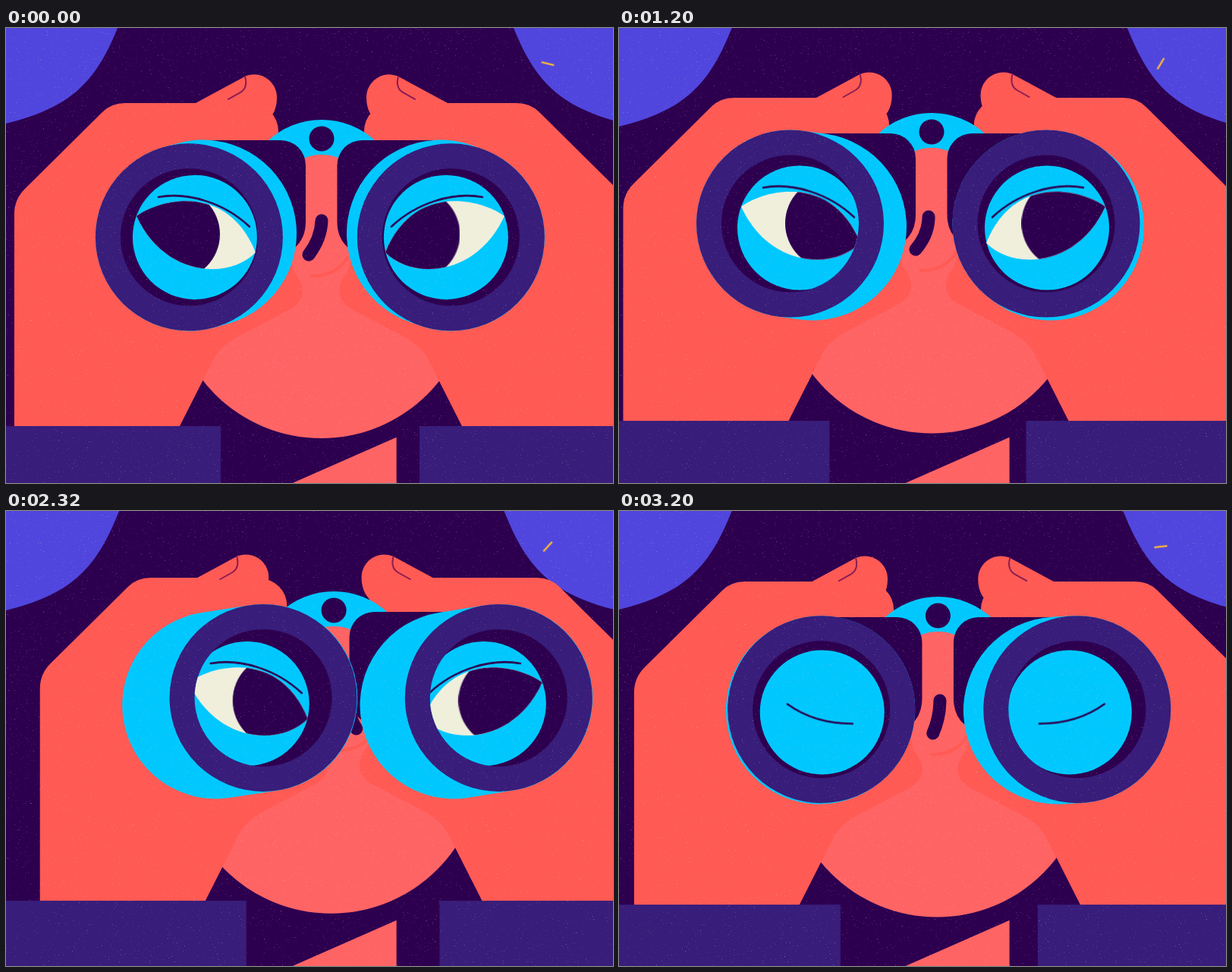
Recreate the animation shown at these times as an HTML page without scripts. Size 800 px wide and 600 px high, loop 3.28 s.

```html
<!DOCTYPE html>
<html lang="en">
<head>
<meta charset="utf-8">
<title>Lookout</title>
<style>
html, body { margin: 0; width: 100%; height: 100%; overflow: hidden; background: #2d004f; }
svg { position: absolute; left: 0; top: 0; width: 800px; height: 600px; }

/* pan, rise: binoculars; al, ar, arm: both arms; thumb, hair, neck: heights;
   fl, fr, fy: front rims; el, er, ey: eyes inside the rims */
@property --pan { syntax: "<length>"; inherits: true; initial-value: 0px; }
@property --rise { syntax: "<length>"; inherits: true; initial-value: 0px; }
@property --al { syntax: "<length>"; inherits: true; initial-value: 0px; }
@property --ar { syntax: "<length>"; inherits: true; initial-value: 0px; }
@property --arm { syntax: "<length>"; inherits: true; initial-value: 0px; }
@property --thumb { syntax: "<length>"; inherits: true; initial-value: 0px; }
@property --hair { syntax: "<length>"; inherits: true; initial-value: 0px; }
@property --neck { syntax: "<length>"; inherits: true; initial-value: 0px; }
@property --fl { syntax: "<length>"; inherits: true; initial-value: 0px; }
@property --fr { syntax: "<length>"; inherits: true; initial-value: 0px; }
@property --fy { syntax: "<length>"; inherits: true; initial-value: 0px; }
@property --el { syntax: "<length>"; inherits: true; initial-value: 0px; }
@property --er { syntax: "<length>"; inherits: true; initial-value: 0px; }
@property --ey { syntax: "<length>"; inherits: true; initial-value: 0px; }

.scene {
  --settle: cubic-bezier(.1,.6,.3,1);
  --drift: cubic-bezier(.2,.4,.5,1);
  --start: cubic-bezier(.65,0,.8,.55);
  --land: cubic-bezier(.2,.6,.4,1);
  animation: turn 3.28s infinite;
}
@keyframes turn {
  0%, 100% { --pan: 0px; --rise: 0px; --al: 0px; --ar: 0px; --arm: 0px; --thumb: 0px; --hair: 0px; --neck: 0px;
    --fl: 241.5px; --fr: 586.5px; --fy: 276px; --el: 7.5px; --er: -6.5px; --ey: 0px;
    animation-timing-function: cubic-bezier(.1,.6,.3,1); }
  14.63% { --pan: -2.5px; --rise: -6px; --al: -4px; --ar: -6px; --arm: -4px; --thumb: -2px; --hair: 3px; --neck: 0px;
    --fl: 230.5px; --fr: 570.5px; --fy: 265px; --el: 10.5px; --er: -1px; --ey: 3px;
    animation-timing-function: cubic-bezier(.2,.4,.5,1); }
  36.59% { --pan: -4px; --rise: -9px; --al: -5.5px; --ar: -8.5px; --arm: -7px; --thumb: -3px; --hair: 4px; --neck: 0px;
    --fl: 225.5px; --fr: 563px; --fy: 258px; --el: 12.5px; --er: 1px; --ey: 5.5px;
    animation-timing-function: cubic-bezier(.65,0,.8,.55); }
  46.34% { --pan: 1px; --rise: 21px; --al: 2px; --ar: 2px; --arm: 22px; --thumb: 20px; --hair: 22px; --neck: 15px;
    --fl: 248.5px; --fr: 592px; --fy: 311.5px; --el: 6.5px; --er: -8px; --ey: -4px;
    animation-timing-function: cubic-bezier(.2,.6,.4,1); }
  60.98% { --pan: 13px; --rise: -15.3px; --al: 26px; --ar: 21px; --arm: -11.5px; --thumb: -4px; --hair: 5px; --neck: 0px;
    --fl: 318.5px; --fr: 636.5px; --fy: 246px; --el: -15.5px; --er: -17.5px; --ey: 7.5px;
    animation-timing-function: cubic-bezier(.2,.4,.5,1); }
  80.49% { --pan: 17px; --rise: -15px; --al: 36px; --ar: 28px; --arm: -11px; --thumb: -4px; --hair: 5px; --neck: 0px;
    --fl: 345px; --fr: 653px; --fy: 246.5px; --el: -23px; --er: -20px; --ey: 7.7px;
    animation-timing-function: cubic-bezier(.65,0,.8,.55); }
  97.56% { --pan: 4.5px; --rise: -8px; --al: 9px; --ar: 7px; --arm: -6px; --thumb: -2px; --hair: 4px; --neck: 0px;
    --fl: 267px; --fr: 604px; --fy: 261.5px; --el: 1px; --er: -10px; --ey: 3.8px;
    animation-timing-function: linear; }
}

.hair-l { transform: translate(0, var(--hair)); }
.hair-r { transform: translate(calc(var(--pan) * -.65), var(--hair)); }
.neck { transform: translate(0, var(--neck)); }
.face { transform: translate(calc(var(--pan) * .8), calc(var(--arm) * .92)); }
.mouth { transform: translate(var(--al), var(--arm)); }
.arm-l { transform: translate(var(--al), var(--arm)); }
.arm-r { transform: translate(var(--ar), var(--arm)); }
.knuckle-l { transform: translate(calc(var(--pan) * .7), var(--arm)); }
.knuckle-r { transform: translate(calc(var(--pan) * 1.1), var(--arm)); }
.thumb-l { transform: translate(calc(var(--pan) * -.67), var(--thumb)); }
.thumb-r { transform: translate(calc(var(--pan) * -.4), var(--thumb)); }
.frame { transform: translate(var(--pan), var(--rise)); }
.front-l { transform: translate(var(--fl), var(--fy)); }
.front-r { transform: translate(var(--fr), var(--fy)); }
.eye-l { transform: translate(var(--el), var(--ey)); }
.eye-r { transform: translate(var(--er), var(--ey)); }

.barrel { fill: none; stroke: #00c8ff; stroke-width: 247; stroke-linecap: round; }
.barrel-l { animation: barrel-l 3.28s infinite; }
.barrel-r { animation: barrel-r 3.28s infinite; }
.nose { fill: none; stroke: #2d004f; stroke-width: 17; stroke-linecap: round; animation: nose 3.28s infinite; }
@keyframes barrel-l {
  0%, 100% { d: path("M259.5 271L241.5 276"); animation-timing-function: var(--settle); }
  14.63% { d: path("M257 265L230.5 265"); animation-timing-function: var(--drift); }
  36.59% { d: path("M255.5 262L225.5 258"); animation-timing-function: var(--start); }
  46.34% { d: path("M260.5 292L248.5 311.5"); animation-timing-function: var(--land); }
  60.98% { d: path("M273.5 256L318.5 246"); animation-timing-function: var(--drift); }
  80.49% { d: path("M277.5 256L345 246.5"); animation-timing-function: var(--start); }
  97.56% { d: path("M264.5 263L267 261.5"); animation-timing-function: linear; }
}
@keyframes barrel-r {
  0%, 100% { d: path("M572.5 271L586.5 276"); animation-timing-function: var(--settle); }
  14.63% { d: path("M570 265L570.5 265"); animation-timing-function: var(--drift); }
  36.59% { d: path("M568.5 262L563 258"); animation-timing-function: var(--start); }
  46.34% { d: path("M573.5 292L592 311.5"); animation-timing-function: var(--land); }
  60.98% { d: path("M586 256L636.5 246"); animation-timing-function: var(--drift); }
  80.49% { d: path("M591 256L653 246.5"); animation-timing-function: var(--start); }
  97.56% { d: path("M577.5 263L604 261.5"); animation-timing-function: linear; }
}
@keyframes nose {
  0%, 100% { d: path("M416 254Q415 278 399 299"); animation-timing-function: var(--settle); }
  14.63% { d: path("M411 251Q410 275 394 294"); animation-timing-function: var(--drift); }
  36.59% { d: path("M408 249Q408 272 391 292"); animation-timing-function: var(--start); }
  46.34% { d: path("M418 283Q418 306 403 328"); animation-timing-function: var(--land); }
  60.98% { d: path("M438 245Q438 268 448 287"); animation-timing-function: var(--drift); }
  80.49% { d: path("M452 245Q453 268 465 287"); animation-timing-function: var(--start); }
  97.56% { d: path("M423 250Q423 272 414 293"); animation-timing-function: linear; }
}

.lid { animation: lid 3.28s linear infinite; }
.crease { fill: none; stroke: #2d004f; stroke-width: 2.6; stroke-linecap: round; animation: crease 3.28s linear infinite; }
.iris { fill: #2d004f; animation: glance 3.28s ease-in-out infinite; }
@keyframes lid {
  0%, 28%, 35.4%, 41.5%, 52.4%, 78%, 87.2%, 92.7%, 100% { d: path("M-77 -28C-40 -54 45 -68 80 20C45 56 -40 53 -77 -28Z"); }
  80.49% { d: path("M-77 -28C-45 0 0 24 80 20C40 36 -30 38 -77 -28Z"); }
  31.7%, 45.1%, 47.6%, 82.3%, 95.7%, 97.7% { d: path("M-77 -28C-35 25 30 32 80 22C30 32 -35 25 -77 -28Z"); }
}
@keyframes crease {
  0%, 28%, 35.4%, 41.5%, 52.4%, 78%, 87.2%, 92.7%, 100% { d: path("M-48 -53C-10 -60 38 -46 72 -14"); }
  80.49% { d: path("M-46 -17C-20 -6 12 4 45 10.5"); }
  31.7%, 45.1%, 47.6%, 82.3%, 95.7%, 97.7% { d: path("M-46 -11C-20 8 8 15 40 15"); }
}
@keyframes glance {
  0%, 100% { transform: translate(-27px, -4px); }
  14.63%, 30% { transform: translate(-30px, -20px); }
  34%, 46.34% { transform: translate(41px, -6px); }
  60.98%, 81% { transform: translate(41px, -4px); }
  86%, 97.56% { transform: translate(-27px, -4px); }
}

.tick { animation: spin 3.28s linear infinite; }
@keyframes spin {
  0%, 100% { transform: rotate(14deg); }
  14.63% { transform: rotate(-40deg); }
  36.59% { transform: rotate(-59deg); }
  46.34% { transform: rotate(-75deg); }
  60.98% { transform: rotate(-33deg); }
  80.49% { transform: rotate(-61deg); }
  97.56% { transform: rotate(-7deg); }
}
.grain { opacity: .45; will-change: transform; pointer-events: none; }
</style>
</head>
<body>
<svg class="scene" viewBox="0 0 800 600">
  <defs>
    <clipPath id="bore"><circle r="90.5"/></clipPath>
    <clipPath id="slit"><path class="lid" d="M-77 -28C-40 -54 45 -68 80 20C45 56 -40 53 -77 -28Z"/></clipPath>
    <path id="hair" fill="#2d004f" d="M170 -50L147 0C118 72 85 105 0 126L-40 136V700H430V-50Z"/>
    <path id="hand" fill="#ff5a54" d="M11 640V245Q11 226 25 212L127 111Q139 99 157 99H300L330 150 380 322C396 341 394 360 374 371L304 408Q281 420 271 442L229 525V640Z"/>
    <g id="thumb">
      <path fill="#ff5a54" d="M250 99L312 65.4A30 30 0 0 1 357 91.5Q357 104 352 113L340 130H250Z"/>
      <path fill="none" stroke="#8a1d55" stroke-width="2" stroke-linecap="round" d="M315 64Q319 79 309 85L293 94"/>
    </g>
    <circle id="knuckle" cx="323" cy="136" r="36" fill="#ff5a54"/>
    <path id="housing" fill="#2d004f" d="M262 148H362A33 33 0 0 1 395 181V255Q395 278 380 290L262 300Z"/>
    <g id="rim">
      <circle r="123.5" fill="#381d7a"/>
      <circle r="90.5" fill="#2d004f"/>
    </g>
  </defs>

  <rect width="800" height="600" fill="#5046de"/>
  <g stroke-width="2.4">
    <g transform="translate(714 47)"><path class="tick" stroke="#f7b53c" d="M-8.5 0H8.5"/></g>
    <path stroke="#00c9a7" transform="translate(83 105) rotate(-62)" d="M-8.5 0H8.5"/>
  </g>
  <g class="hair-l"><use href="#hair"/></g>
  <g class="hair-r"><use href="#hair" transform="matrix(-1 0 0 1 816 0)"/></g>

  <path class="neck" fill="#ff6464" d="M514.6 539.7V640H287Z"/>
  <circle class="face" cx="415.5" cy="343" r="198" fill="#ff6464"/>
  <path class="mouth" fill="none" stroke="#ff5a54" stroke-width="4" stroke-linecap="round" d="M403 327Q435 327 450 303"/>
  <path class="nose" d="M416 254Q415 278 399 299"/>

  <g class="arm-l">
    <use href="#hand"/>
    <rect x="-80" y="525" width="363" height="140" fill="#381d7a"/>
  </g>
  <g class="arm-r">
    <use href="#hand" transform="matrix(-1 0 0 1 830 0)"/>
    <rect x="545" y="525" width="363" height="140" fill="#381d7a"/>
  </g>
  <g class="knuckle-l"><use href="#knuckle"/></g>
  <g class="knuckle-r"><use href="#knuckle" transform="matrix(-1 0 0 1 831 0)"/></g>
  <g class="thumb-l"><use href="#thumb"/></g>
  <g class="thumb-r"><use href="#thumb" transform="matrix(-1 0 0 1 832 0)"/></g>

  <g class="frame">
    <path fill="none" stroke="#00c8ff" stroke-width="46" d="M335 225A81 81 0 0 1 497 225"/>
    <circle cx="416" cy="146" r="16.5" fill="#2d004f"/>
    <use href="#housing"/>
    <use href="#housing" transform="matrix(-1 0 0 1 831.5 0)"/>
  </g>

  <path class="barrel barrel-l" d="M259.5 271L241.5 276"/>
  <path class="barrel barrel-r" d="M572.5 271L586.5 276"/>

  <g class="front-l">
    <use href="#rim"/>
    <g clip-path="url(#bore)"><g class="eye-l">
      <circle r="82" fill="#00c8ff"/>
      <g clip-path="url(#slit)">
        <circle r="90" fill="#efefdc"/>
        <circle class="iris" r="60"/>
      </g>
      <path class="crease" d="M-48 -53C-10 -60 38 -46 72 -14"/>
    </g></g>
  </g>
  <g class="front-r">
    <use href="#rim"/>
    <g clip-path="url(#bore)"><g class="eye-r">
      <circle r="82" fill="#00c8ff"/>
      <g transform="scale(-1 1)">
        <g clip-path="url(#slit)">
          <circle r="90" fill="#efefdc"/>
          <g transform="matrix(-1 0 0 1 14.5 0)"><circle class="iris" r="60"/></g>
        </g>
        <path class="crease" d="M-48 -53C-10 -60 38 -46 72 -14"/>
      </g>
    </g></g>
  </g>
</svg>

<svg class="grain" viewBox="0 0 800 600">
  <filter id="specks" x="0" y="0" width="1" height="1" color-interpolation-filters="sRGB">
    <feTurbulence type="fractalNoise" baseFrequency=".55" numOctaves="2" seed="7"/>
    <feColorMatrix values="0 0 0 0 1  0 0 0 0 .8  0 0 0 0 .85  0 0 0 5 -3.6"/>
  </filter>
  <rect width="800" height="600" filter="url(#specks)"/>
</svg>
</body>
</html>
```
